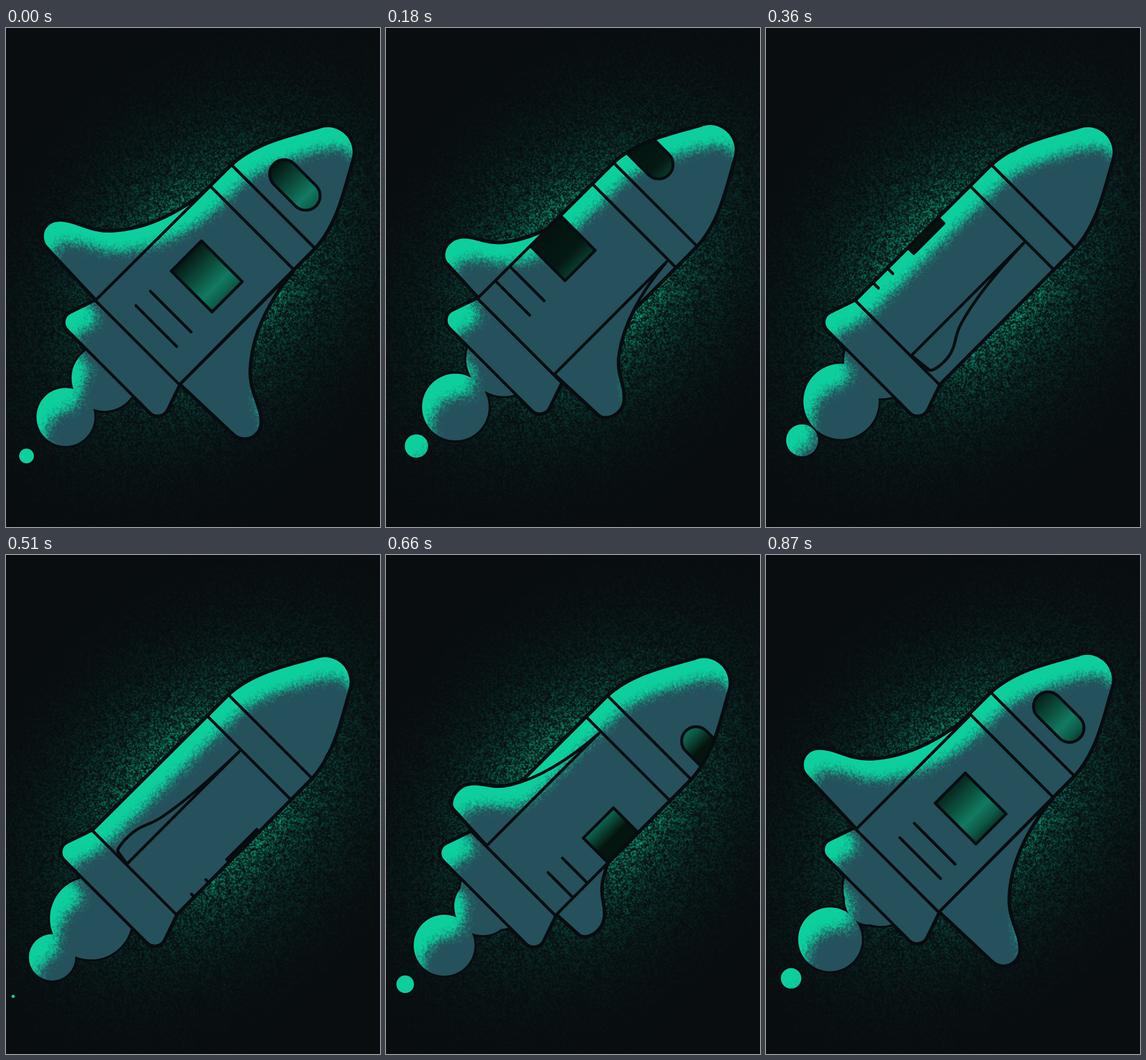
These frames come from a looping animation (648 by 864 pixels, 900 ms). An HTML page with a canvas:

```html
<!DOCTYPE html>
<html lang="en">
<head>
<meta charset="utf-8">
<title>Rocket</title>
<style>
  html, body { margin: 0; height: 100%; overflow: hidden; background: #090d10; }
  canvas { display: block; }
</style>
</head>
<body>
<canvas id="stage" width="648" height="864"></canvas>
<script>
const W = 648, H = 864, LOOP = 900, STEP = 30;
const INK = '#080c0f', TEAL = '#24515c', GREEN = [12, 207, 157];
const stage = document.getElementById('stage').getContext('2d');

function layer(w, h) {
  const canvas = document.createElement('canvas');
  canvas.width = w;
  canvas.height = h;
  return canvas.getContext('2d', { willReadFrequently: w < W });
}

// Grain and light are worked out at half size, which gives soft two-pixel specks.
const w = W / 2, h = H / 2;
const paint = layer(W, H), mask = layer(w, h), light = layer(w, h), glow = layer(w, h);

let seed = 4711;
const random = () => (seed = seed * 16807 % 2147483647) / 2147483647;
const grain = Float32Array.from({ length: w * h }, random);

// Turns alpha(i, oldAlpha) into green pixels.
function tint(ctx, alpha) {
  const image = ctx.getImageData(0, 0, w, h), d = image.data;
  for (let i = 0; i < w * h; i++) {
    const a = alpha(i, d[i * 4 + 3] / 255);
    d[i * 4] = GREEN[0];
    d[i * 4 + 1] = GREEN[1];
    d[i * 4 + 2] = GREEN[2];
    d[i * 4 + 3] = 255 * a;
  }
  ctx.putImageData(image, 0, 0);
}

tint(glow, i => {
  const dx = (i % w) * 2 - 345, dy = Math.floor(i / w) * 2 - 428;
  const r = Math.hypot((dx - dy) / 198, (dx + dy) / 141);
  return 4.5 * Math.exp(-1.4 * r) * random() ** 2;
});

// Rocket space: x runs from tail to nose, y across the hull.
const hull = new Path2D();
const noseAngle = 62 * Math.PI / 180;
hull.moveTo(0, -103);
hull.lineTo(332, -102);
hull.bezierCurveTo(393, -99, 446, -61, 486, -40);
hull.arc(465, 0, 45.5, -noseAngle, noseAngle);
hull.bezierCurveTo(446, 61, 393, 99, 332, 102);
hull.lineTo(0, 103);
hull.arcTo(-72, 128, -72, 0, 19);
hull.arcTo(-72, -128, 0, -103, 19);
hull.closePath();

const seams = new Path2D('M-1.5-103V103M279.5-102V102M331.5-102V102');

const finShape = new Path2D();
finShape.moveTo(275, 102);
finShape.bezierCurveTo(206, 109, 147, 130, 104, 169);
finShape.bezierCurveTo(74, 196, 74, 226, 52, 248);
finShape.arc(32, 228, 28, Math.PI / 4, Math.PI);
finShape.lineTo(0, 102);
finShape.closePath();

function fin(turn) {
  const path = new Path2D();
  path.addPath(finShape, new DOMMatrix().translate(0, 1.5).scale(1, turn));
  return path;
}

function smoke(t) {
  const path = new Path2D();
  const puff = (x, r) => {
    path.moveTo(x + r, 3);
    path.arc(x, 3, r, 0, 7);
  };
  puff(-43, 65);
  const first = 169 - 0.3 * t;
  for (let k = -3; k < 6; k++) {
    const x = first + 67.5 * k;
    const r = Math.min(0.555 * (x - 11), 71.5) - 0.033 * Math.max(0, x - 148) ** 2;
    if (r > 0) puff((x - 229.2) * Math.SQRT2, r);
  }
  return path;
}

// Strokes a path except where another one covers it.
function strokeBehind(path, cover) {
  const open = new Path2D();
  open.rect(-2000, -2000, 4000, 4000);
  open.addPath(cover);
  stage.save();
  stage.clip(open, 'evenodd');
  stage.stroke(path);
  stage.restore();
}

function shade(parts, pose) {
  mask.resetTransform();
  mask.clearRect(0, 0, w, h);
  mask.setTransform(new DOMMatrix().scale(0.5).multiply(pose));
  parts.forEach(p => mask.fill(p));

  light.clearRect(0, 0, w, h);
  light.filter = 'blur(8px)';
  light.drawImage(mask.canvas, 6.5, 18);
  light.filter = 'none';
  tint(light, (i, a) => {
    const lit = 1 - a + (grain[i] - 0.5) * 0.4;
    return Math.max(0, Math.min(1, (lit - 0.5) * 2 + 0.5));
  });

  paint.resetTransform();
  paint.clearRect(0, 0, W, H);
  paint.setTransform(pose);
  paint.fillStyle = TEAL;
  parts.forEach(p => paint.fill(p));
  paint.resetTransform();
  paint.globalCompositeOperation = 'source-atop';
  paint.drawImage(light.canvas, 0, 0, W, H);
  paint.globalCompositeOperation = 'source-over';
}

const glass = stage.createLinearGradient(0, -102, 0, 102);
[[0, '#03130f'], [0.28, '#041913'], [0.48, '#0b4f3d'], [0.63, '#117a61'],
 [0.74, '#0c5a47'], [0.88, '#04140f']].forEach(s => glass.addColorStop(...s));

function drawWindows(t) {
  const c = t < 440 ? 4 - 0.397 * t : 4 + 0.367 * (LOOP - t);
  const panes = new Path2D();
  panes.rect(127.6, c - 50, 74, 100);
  panes.roundRect(359.5, c - 55.5, 50, 103, 25);
  stage.save();
  stage.clip(hull);
  stage.fillStyle = glass;
  stage.fill(panes);
  stage.stroke(panes);
  stage.stroke(new Path2D(`M77.4 ${c - 51}v100M42 ${c - 51}v100`));
  stage.restore();
}

function draw(t) {
  const bob = 5.3 * Math.cos((t - 180) / LOOP * 2 * Math.PI);
  const pose = new DOMMatrix().translate(227 + bob, 545.3 - bob).rotate(-45);
  const turn = Math.cos(t / LOOP * Math.PI);
  const front = fin(turn), back = fin(-turn);
  const parts = [smoke(t), back, hull, front];
  shade(parts, pose);

  stage.resetTransform();
  stage.fillStyle = '#090d10';
  stage.fillRect(0, 0, W, H);
  stage.drawImage(glow.canvas, 0, 0, W, H);

  stage.strokeStyle = INK;
  stage.lineJoin = stage.lineCap = 'round';
  stage.setTransform(pose);
  stage.lineWidth = 7;
  parts.forEach(p => stage.stroke(p));
  stage.resetTransform();
  stage.drawImage(paint.canvas, 0, 0);

  stage.setTransform(pose);
  stage.lineWidth = 5;
  strokeBehind(back, hull);
  drawWindows(t);
  strokeBehind(hull, front);
  strokeBehind(seams, front);
  stage.stroke(front);
}

let shown = -1;
function tick() {
  const t = Math.floor(performance.now() % LOOP / STEP) * STEP;
  if (t !== shown) draw(shown = t);
  requestAnimationFrame(tick);
}
tick();
</script>
</body>
</html>
```
